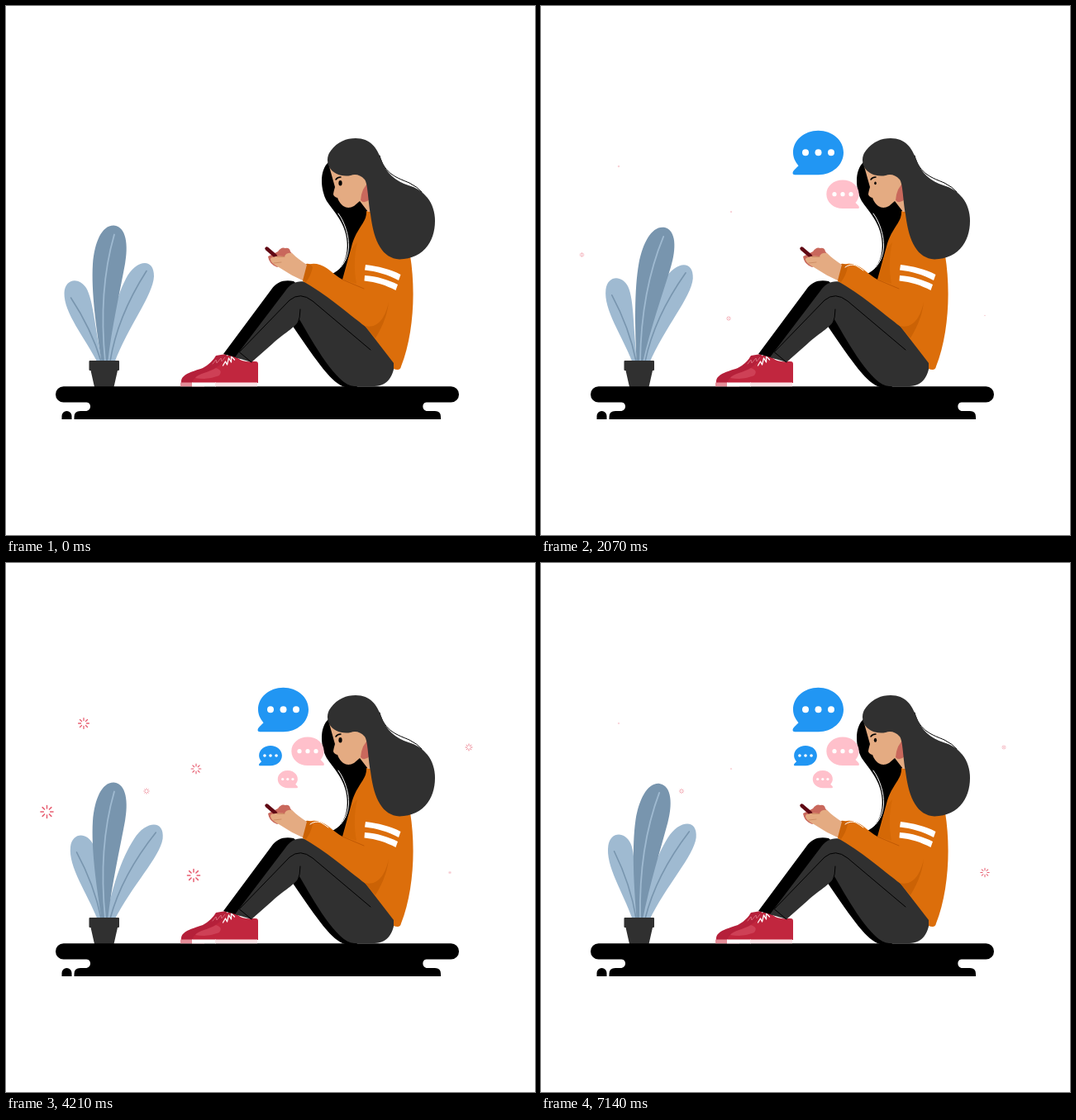
An HTML page that plays this animation: 640x640 px, repeating every 7210 ms.

```html
<!DOCTYPE html>
<html lang="en">
<head>
<meta charset="utf-8">
<title>Chatting</title>
<style>
html, body { margin: 0; width: 100%; height: 100%; overflow: hidden; background: #fff; }
svg { display: block; width: 100%; height: 100%; }
.line { fill: none; stroke-linecap: round; stroke-linejoin: round; }
</style>
</head>
<body>
<svg viewBox="0 0 640 640">
  <defs>
    <path id="balloon" d="M0 27H-28C-32 27-31.500 23.500-29 21L-24 16C-28 11-30.500 6-30.500 0C-30.500-15-17-26.500 0-26.500S30.500-15 30.500 0S17 27 0 27Z"/>
  </defs>

  <g id="sparks" class="line" stroke="#e75d70"></g>

  <!-- plant -->
  <g id="leftLeaf">
    <path fill="#9fbad1" d="M111 432C95 400 70 372 70.500 347C71 330 88 327 97 341C106 356 108 395 117 432Z"/>
    <path class="line" stroke="#7895ae" stroke-width="1.600" d="M78.500 353C95 378 107 403 115 430"/>
  </g>
  <g id="rightLeaf">
    <path fill="#9fbad1" d="M121 432C124 395 131 357 145 330C156 308 179 303 179 327C178 350 148 387 131 432Z"/>
    <path class="line" stroke="#7895ae" stroke-width="1.600" d="M170 320.500C148 355 132 392 126 430"/>
  </g>
  <g id="midLeaf">
    <path fill="#7895ae" d="M116 432C109 390 103 345 105 312C107 286 116 265 130.500 265.500C146 267 148 290 144 312C138 345 128 388 123 432Z"/>
    <path class="line" stroke="#9fbad1" stroke-width="1.800" d="M131 276.500C119 318 114 370 120 430"/>
  </g>
  <path fill="#303030" d="M101.500 429H136Q137 429 137 430V440Q137 441 136 441H135L130.500 461H107L102.500 441H101.500Q100.500 441 100.500 440V430Q100.500 429 101.500 429Z"/>

  <!-- ground -->
  <rect x="60" y="460.300" width="488" height="19.200" rx="9.600"/>
  <path d="M96 479C104 479 104 490 96 490H90Q82.500 490 82.500 497V500H526V497Q526 490 519 490H510C502.500 490 502.500 479 510 479ZM67.500 500V496A6 6 0 0 1 79.500 496V500Z"/>

  <!-- shoes -->
  <path fill="#b5203a" d="M212 456C211 446 223 443 238 438Q249 432 254 423L266 421L278 440V456Z"/>
  <path fill="#e58e99" d="M211 455.500H240V460.300H211Z"/>
  <path class="line" stroke="#d96b7b" stroke-width="1" d="M250 433l4-5 1 4 5-6 1 4 4-5"/>
  <path fill="#c1263e" d="M226 456C226 448 237 446 247 441C257 437 263 431 268 423L275 421C281 428 288 431 296 430H302Q305 430 305 433V456Z"/>
  <path fill="#ce4056" d="M229 450C232 445 246 443 254 438Q263 441 258 447Q245 453 229 450Z"/>
  <path fill="#fff" d="M225 455.500H254V460.300H225Z"/>
  <path fill="#fbe3e6" d="M253 455.500H304V460.300H253Z"/>
  <path class="line" stroke="#fff" stroke-width="1.300" d="M262.500 435l3-5 2 4 2-8 3 5 0-7 4 4"/>

  <!-- back hair -->
  <path d="M391 188C379 198 380 221 388 236C395 247 411 262 412.500 285C414 305 407 318 393 325L408 333L424 300L437 264V225L395 192Z"/>
  <path class="line" stroke="#fff" d="M402 251C410 262 415 278 414.500 292C413.500 306 407 316 399 321"/>

  <!-- legs -->
  <path d="M263 421L321 343C328 333 337 331 348 333L364 347L285 427ZM346 386L358 368L425 461H410C395 457 378 433 346 386Z"/>
  <path fill="#303030" d="M277 425L337 346C345 334 355 331 366 335C408 345 448 393 470 430C470 446 462 460 446 460H421C400 459 372 408 355 379C352 388 333 398 322 409L297 431Z"/>
  <path class="line" stroke="#000" d="M283 418L343 356Q356 345 371 357L441 416M356 367Q356 377 353 384M279 416L297 431"/>

  <!-- sweater -->
  <path fill="#dc6e0b" d="M436 248C437 262 424 268 418 291L407 331C396 325 388 314 376 312Q368 311 363 314L359 333C385 347 414 372 435 388L469 432V439Q477 442 478 436C493 398 496 345 489 302L450 250Z"/>
  <path fill="#cb6205" d="M434 387C449 391 459 378 463 358C461 378 452 393 447 402Z"/>
  <path fill="#d46806" d="M425 286C421 303 421 320 424 336L408 331L418 294Z"/>
  <path fill="#cb6205" d="M363 312Q368 311 371 316Q369 326 363 334L358 331Z"/>
  <path class="line" stroke="#b95503" stroke-width=".800" d="M407 331L433 342"/>
  <path id="sleeveGap" class="line" stroke="#fff" stroke-width="1" d="M368 316Q374 311.500 381 314Q386 317 390 320"/>
  <path fill="#fff" d="M435 313C450 315 465 318 477.500 325L475 332C462 325 448 321 434 319.500ZM434 326C449 327 462 331 474 337L471.500 344C460 338 448 334 433.500 332.500Z"/>

  <!-- hands and phone -->
  <path fill="#c9685c" d="M317 303L329 297Q333 291 338 293Q343 292 344 297L350 304L328 316Q318 312 317 303Z"/>
  <path class="line" stroke="#5f0713" stroke-width="4.400" d="M315.500 293.500L326 302.500"/>
  <path fill="#e4ab82" d="M320 306Q325 301 337 303Q339 298 346 299Q353 306 364 313L359 332Q348 327 343 324L330 316Q320 311 320 306Z"/>
  <path id="thumb" class="line" stroke="#e4ab82" stroke-width="3.600" d="M322 306L335 305"/>
  <path class="line" stroke="#c9875f" stroke-width=".800" d="M324 311L333 310M328 303.500L337 303.500"/>

  <!-- head -->
  <path fill="#e4ab82" d="M391 194Q396 212 398 219Q396 226 396 228Q397 231 401 232Q403 238 408 242Q414 246 421 242L428 236L438 249H447V200L400 185Z"/>
  <path fill="#c9685c" d="M440 212Q430 220 429 235Q433 240 440 234Z"/>
  <ellipse id="eye" rx="2.100" ry="3.200"/>
  <path class="line" stroke="#000" stroke-width="1.500" d="M399 210Q401 207 405 207"/>
  <path class="line" stroke="#000" d="M452 181C458 204 474 208 488 214Q498 219 503 225"/>
  <path fill="#303030" d="M391 195Q386 184 393 175C401 164 412 160 423 160C441 160 449 172 454 186C460 203 472 212 487 217C507 223 519 239 519 260C519 287 503 306 476 306.500C455 305 445 285 441 252C438 236 438 216 434 210C429 204 422 203 417 205C406 207 396 203 391 195Z"/>

  <g id="bubbles"></g>
</svg>
<script>
const LOOP = 7.21, PULSE = 1.8;
const NS = 'http://www.w3.org/2000/svg';
const $ = id => document.getElementById(id);
const clamp = x => Math.min(1, Math.max(0, x));
const ease = x => (1 - Math.cos(Math.PI * clamp(x))) / 2;

function add(parent, tag, attrs = {}) {
  const el = document.createElementNS(NS, tag);
  for (const k in attrs) el.setAttribute(k, attrs[k]);
  return parent.appendChild(el);
}

// Eased value from [time, value] pairs
function track(keys, t) {
  if (t <= keys[0][0]) return keys[0][1];
  for (let i = 1; i < keys.length; i++) {
    const [a, from] = keys[i - 1], [b, to] = keys[i];
    if (t < b) return from + (to - from) * ease((t - a) / (b - a));
  }
  return keys[keys.length - 1][1];
}

// x, y, radius, delay
const sparks = [
  [94, 194, 11.5, .1], [230, 249, 10.5, .1], [170, 276, 10.5, .26], [49.5, 301, 10, -.04],
  [227, 378, 10, -.04], [560, 223, 11, .22], [537, 374.5, 11, .4]
].map(([x, y, r, delay]) => {
  let d = '';
  for (let i = 0; i < 8; i++) {
    const c = Math.cos(i * Math.PI / 4), s = Math.sin(i * Math.PI / 4);
    d += `M${c * .5} ${s * .5}L${c * .92} ${s * .92}`;
  }
  return { x, y, r, delay, el: add($('sparks'), 'path', { d, 'stroke-width': .18 }) };
});

// x, y, size, side of the tail, start, colour
const bubbles = [
  [335.5, 177.3, 1, 1, .43, '#2196f3'], [365, 227.7, .645, -1, 1.17, '#ffc0cb'],
  [320, 233, .455, 1, 2.1, '#2196f3'], [340.8, 261.5, .395, -1, 3.15, '#ffc0cb']
].map(([x, y, size, side, start, fill]) => {
  const el = add($('bubbles'), 'g');
  add(el, 'use', { href: '#balloon', fill, transform: `scale(${side} 1)` });
  for (const cx of [-15.5, 0, 15.5]) add(el, 'circle', { cx, r: 4, fill: '#fff' });
  return { x, y, size, start, el };
});

// id, pivot, angle, sway
const leaves = [
  ['midLeaf', 119, 430, 6.8, [[.1, 0], [2.4, 1], [4.2, 0], [6.4, 1], [8.3, 0]]],
  ['leftLeaf', 117, 430, 10.3, [[1, 0], [3.1, 1], [5.3, 0], [8.2, 1]]],
  ['rightLeaf', 123, 430, 7.4, [[1, 0], [3.6, 1], [5.8, 0], [8, 1]]]
];

function draw(t) {
  for (const { x, y, r, delay, el } of sparks) {
    const p = t < delay ? 0 : Math.sin(Math.PI * (t - delay) / PULSE) ** 2;
    el.setAttribute('transform', `translate(${x} ${y}) scale(${r * p})`);
    el.setAttribute('visibility', p > .01 ? 'visible' : 'hidden');
  }
  for (const { x, y, size, start, el } of bubbles) {
    const s = size * track([[0, 0], [.42, 1.055], [.9, 1]], t - start);
    const dy = size * track([[0, 18], [.42, -8], [.9, 0]], t - start);
    el.setAttribute('transform', `translate(${x} ${y + dy}) scale(${s})`);
    el.setAttribute('visibility', s > 0 ? 'visible' : 'hidden');
  }
  for (const [id, x, y, angle, keys] of leaves)
    $(id).setAttribute('transform', `rotate(${angle * track(keys, t)} ${x} ${y})`);

  const open = track([[1.9, 1], [2.05, .6], [2.1, .6], [2.25, 1], [7.05, 1], [7.2, .7]], t);
  $('eye').setAttribute('transform', `translate(404.5 214.3) scale(${open})`);
  $('thumb').setAttribute('transform', `translate(0 ${.6 * Math.sin(t * 7)})`);
  $('sleeveGap').setAttribute('opacity', clamp(t * 2));
}

function tick() {
  draw(performance.now() / 1000 % LOOP);
  requestAnimationFrame(tick);
}
tick();
</script>
</body>
</html>
```
